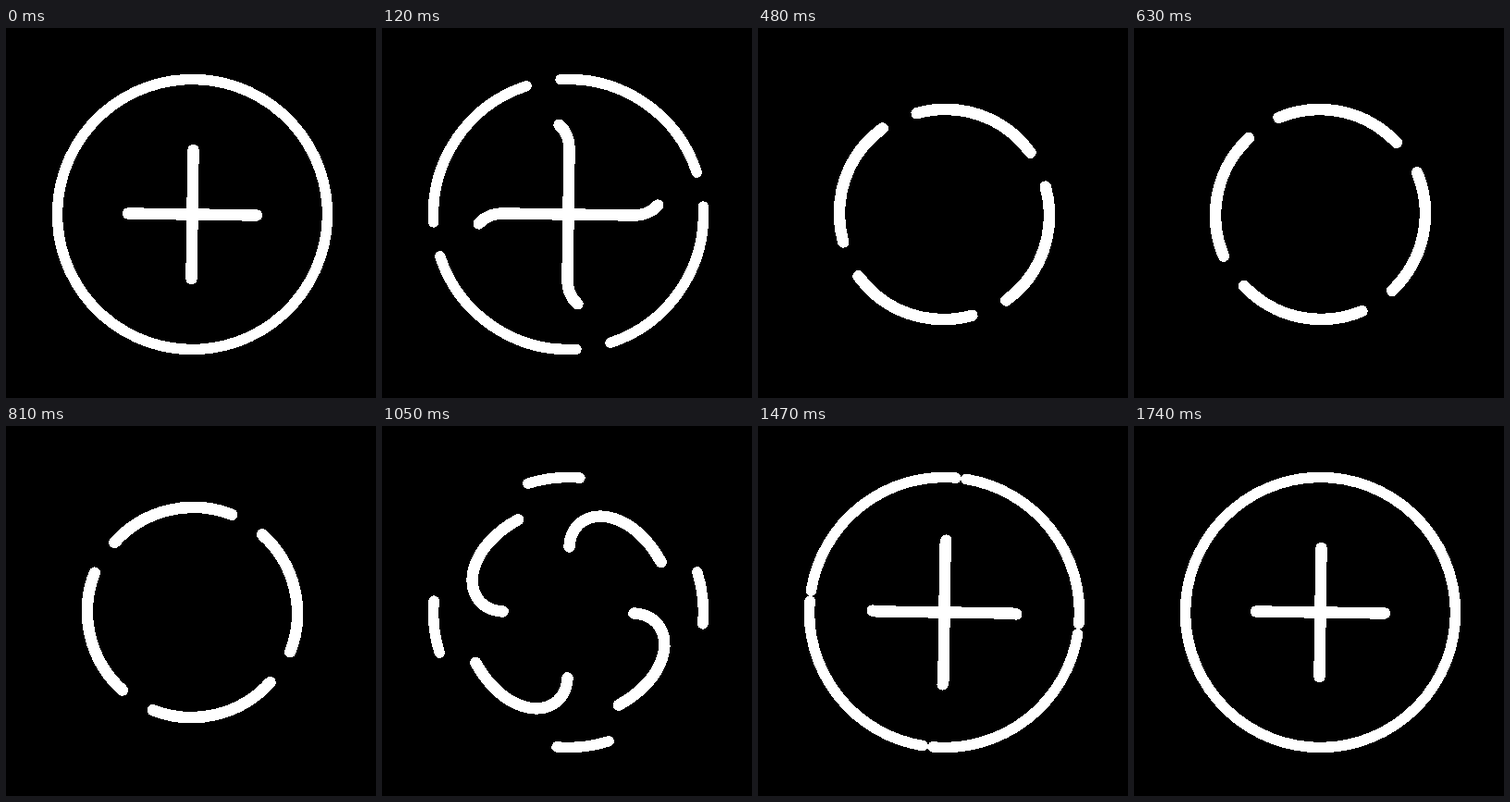
An HTML page for the animation above (3.86 s loop, 400 by 400 pixels).

```html
<!DOCTYPE html>
<html lang="en">
<head>
<meta charset="utf-8">
<title>Plus loader</title>
<style>
  html, body { margin: 0; width: 100%; height: 100%; overflow: hidden; background: #000; }
  svg { display: block; width: 100%; height: 100%; }
  path { fill: none; stroke: #fff; stroke-linecap: round; shape-rendering: crispEdges; }
</style>
</head>
<body>
<svg viewBox="0 0 400 400">
  <defs>
    <g id="quarter">
      <path id="rim" stroke-width="11.5"/>
      <!-- up the bar, hook onto the ring, 460 degrees round, hook back into the bar -->
      <path id="strand" stroke-width="12.5" pathLength="1394"
        d="M0 69.5V-69.5C0 -105 -38.4 -117.3 -73.6 -87.7
           A114.5 114.5 0 0 0 -73.6 87.7
           A114.5 114.5 0 0 0 73.6 -87.7
           A114.5 114.5 0 0 0 -73.6 87.7
           C-38.4 117.3 0 105 0 69.5V-69.5"/>
    </g>
  </defs>
  <g transform="translate(201.5 201.5) rotate(0.8)">
    <use href="#quarter"/>
    <use href="#quarter" transform="rotate(90)"/>
    <use href="#quarter" transform="rotate(180)"/>
    <use href="#quarter" transform="rotate(270)"/>
  </g>
</svg>
<script>
const LOOP = 3860, STEP = 30;
const DASH = 139, TRAVEL = 1255;
const RIM_RADIUS = 146, RIM_RATE = 0.48; // degrees of rim per unit of travel

// Time in ms, distance travelled, speed
const keys = [
  [0, 0, 0],
  [240, 123, 1.02],
  [480, 412, 1.32],
  [810, 835, 1.27],
  [1050, 1114, 0.8],
  [1260, 1213, 0.24],
  [1740, TRAVEL, 0]
];

const rim = document.getElementById('rim');
const strand = document.getElementById('strand');
strand.setAttribute('stroke-dasharray', `${DASH} 3000`);

function distanceAt(time) {
  const next = keys.findIndex(key => key[0] > time);
  if (next < 0) return TRAVEL;
  const [t0, p0, v0] = keys[next - 1];
  const [t1, p1, v1] = keys[next];
  const span = t1 - t0, u = (time - t0) / span, w = 1 - u;
  return p0 * w * w * (1 + 2 * u) + p1 * u * u * (3 - 2 * u)
    + span * u * w * (v0 * w - v1 * u);
}

function rimPoint(degrees) {
  const a = degrees * Math.PI / 180;
  return `${RIM_RADIUS * Math.cos(a)} ${-RIM_RADIUS * Math.sin(a)}`;
}

function rimArc(from, to) {
  if (to <= from) return '';
  return `M${rimPoint(from)}A${RIM_RADIUS} ${RIM_RADIUS} 0 0 0 ${rimPoint(to)}`;
}

function draw(time) {
  const travelled = distanceAt(time);
  strand.setAttribute('stroke-dashoffset', -travelled);

  // The rim is erased from its tail first, then grows back from its head
  const arc = travelled < TRAVEL / 2
    ? rimArc(4.1 + travelled * RIM_RATE, 94.1)
    : rimArc(85.9, 175.9 - (TRAVEL - travelled) * RIM_RATE);
  rim.setAttribute('d', arc);
}

const start = performance.now();
function tick() {
  const time = (performance.now() - start) % LOOP;
  draw(Math.floor(time / STEP) * STEP);
  requestAnimationFrame(tick);
}
tick();
</script>
</body>
</html>
```
